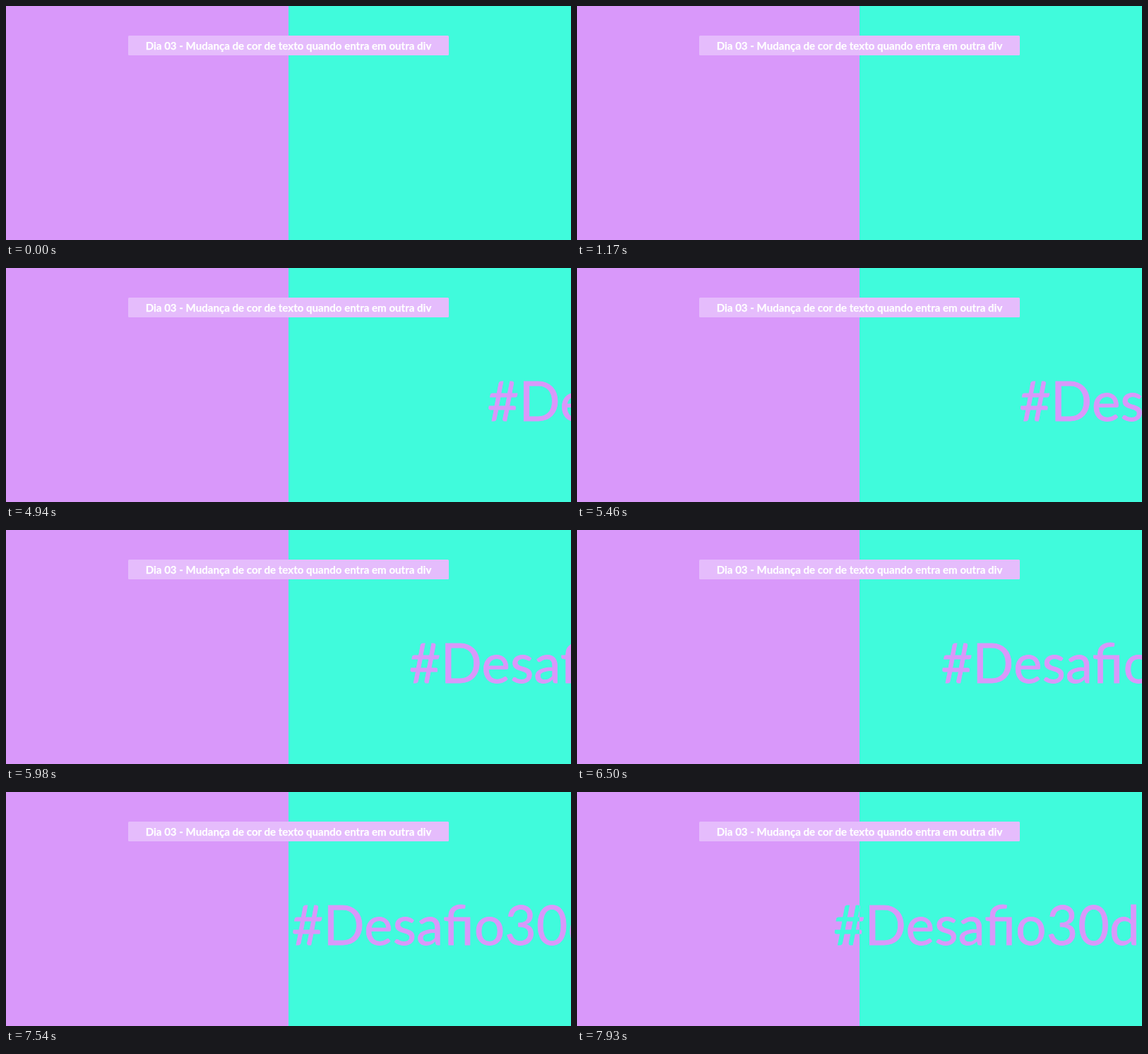
An HTML page for the animation above (8 s loop, 800 px wide and 332 px high).

```html
<!DOCTYPE html>
<html lang="pt">
<head>
<meta charset="utf-8">
<title>Mudança de cor de texto</title>
<style>
  html, body { margin: 0; width: 100%; height: 100%; overflow: hidden; }
  body > svg { display: block; width: 800px; height: 332px; }
  svg svg { overflow: hidden; }
  text { font-family: Lato, sans-serif; }
  .slide { font-size: 76.9px; stroke-width: 0.8px; }
  .title { font-size: 15.08px; font-weight: 700; fill: #fff; stroke: #fff; stroke-width: 0.25px; text-anchor: middle; }
  .purple { fill: #d998fa; }
  .teal { fill: #40fbdc; }
  .slide.purple { stroke: #d998fa; }
  .slide.teal { stroke: #40fbdc; }
</style>
</head>
<body>
<svg viewBox="0 0 800 332">
  <!-- each half clips its own copy of the sliding text -->
  <svg width="400" height="332" viewBox="0 0 400 332">
    <rect class="purple" width="400" height="332"/>
    <text class="slide teal" y="216.5">#Desafio30dias</text>
  </svg>
  <svg x="400" width="400" height="332" viewBox="400 0 400 332">
    <rect class="teal" x="400" width="400" height="332"/>
    <text class="slide purple" y="216.5">#Desafio30dias</text>
  </svg>
  <rect x="173" y="42" width="454" height="28" rx="1.5" fill="#e5bcfc"/>
  <text class="title" x="400" y="62">Dia 03 - Mudança de cor de texto quando entra em outra div</text>
</svg>
<script>
  const LOOP = 8000, STEP = 130, APPEAR = 4420, SPEED = 0.10655;
  const slides = document.querySelectorAll('.slide');

  function draw() {
    const t = performance.now() % LOOP;
    const stepped = Math.floor(t / STEP) * STEP;
    const x = stepped < APPEAR ? 900 : 737 - (stepped - APPEAR) * SPEED;
    slides.forEach(el => el.setAttribute('x', x));
    requestAnimationFrame(draw);
  }
  draw();
</script>
</body>
</html>
```
